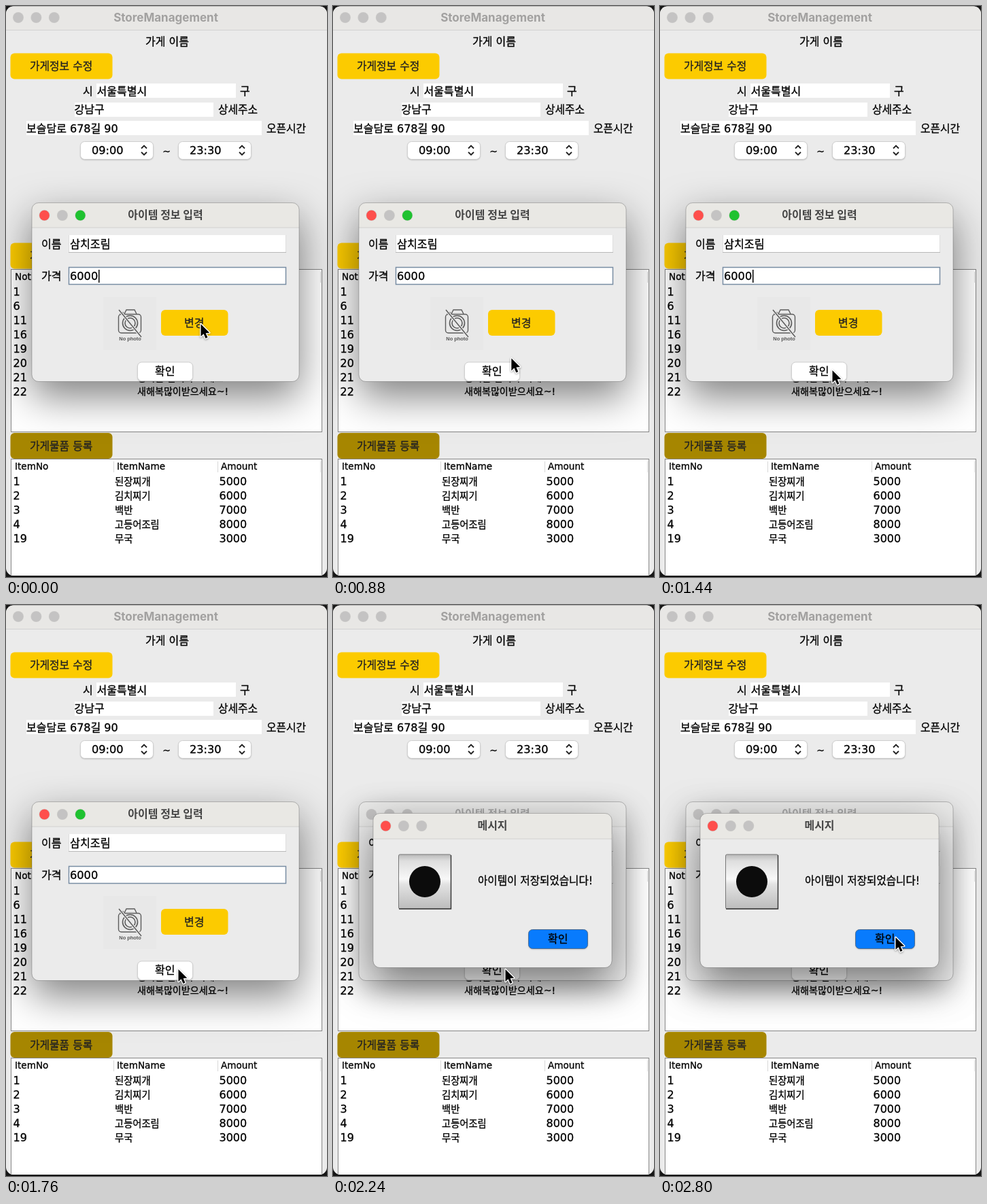
Animation of 472x840 px, one loop 2.88 s. Source, as an HTML page with a canvas:

```html
<!DOCTYPE html>
<html lang="ko">
<head>
<meta charset="utf-8">
<title>StoreManagement</title>
<style>
html, body { margin: 0; width: 100%; height: 100%; overflow: hidden; background: #161616; }
canvas { display: block; }
</style>
</head>
<body>
<canvas id="stage" width="472" height="840"></canvas>
<script>
const ctx = document.getElementById('stage').getContext('2d');
const LOOP = 2880, STEP = 80;
const UI = '"DejaVu Sans", "Noto Sans CJK KR", "Noto Sans CJK JP", sans-serif';
const TITLE = 'Inter, "Noto Sans CJK KR", "Noto Sans CJK JP", sans-serif';
const YELLOW = '#fccb00', PANEL = '#ebebeb', GREY = '#c4c3c3', FOCUS = '#788da3';

// Text is placed by its left edge (or centre) and its vertical middle.
function text(s, x, y, size = 16, color = '#000', align = 'left', weight = 500, family = UI) {
  ctx.font = `${weight} ${size}px ${family}`;
  ctx.fillStyle = color;
  ctx.textAlign = align;
  const base = y + size * 0.365;
  ctx.fillText(s, x, base);
  if (weight === 500) {
    ctx.strokeStyle = color;
    ctx.lineWidth = 0.3;
    ctx.strokeText(s, x, base);
  }
}

function rect(x, y, w, h, color) {
  ctx.fillStyle = color;
  ctx.fillRect(x, y, w, h);
}

function round(x, y, w, h, r, fill, stroke, line = 1) {
  ctx.beginPath();
  ctx.roundRect(x, y, w, h, r);
  if (fill) { ctx.fillStyle = fill; ctx.fill(); }
  if (stroke) { ctx.strokeStyle = stroke; ctx.lineWidth = line; ctx.stroke(); }
}

function disc(x, y, r, color) {
  ctx.beginPath();
  ctx.arc(x, y, r, 0, Math.PI * 2);
  ctx.fillStyle = color;
  ctx.fill();
}

function path(points, stroke, line) {
  ctx.beginPath();
  points.forEach(([x, y], i) => i ? ctx.lineTo(x, y) : ctx.moveTo(x, y));
  if (stroke) { ctx.strokeStyle = stroke; ctx.lineWidth = line; ctx.stroke(); }
}

function shadow(color, blur, dy) {
  ctx.shadowColor = color;
  ctx.shadowBlur = blur;
  ctx.shadowOffsetY = dy;
}

function raised(x, y, w, h, fill, border = '#cfcfcf') {
  ctx.save();
  shadow('rgba(0,0,0,.25)', 2, 1);
  round(x, y, w, h, 6, fill);
  ctx.restore();
  round(x, y, w, h, 6, null, border);
}

function lights(x, y, colors) {
  colors.forEach((c, i) => {
    disc(x + i * 26.4, y, 8, 'rgba(0,0,0,.12)');
    disc(x + i * 26.4, y, 7.4, c);
  });
}

function yellowButton(label, y, fill = YELLOW) {
  round(6.5, y, 150, 38, 6, fill);
  text(label, 35, y + 19, 15.8, '#222');
}

function spinner(x, value) {
  raised(x + 0.5, 199.5, 107, 26, '#fff');
  text(value, x + 17, 212.5, 16.2);
  const c = x + 94;
  path([[c - 4, 209.5], [c, 205.5], [c + 4, 209.5]], '#222', 1.8);
  path([[c - 4, 215], [c, 219], [c + 4, 215]], '#222', 1.8);
}

function table(y, h, heads) {
  rect(7, y, 458, h, '#fff');
  ctx.strokeStyle = '#868686';
  ctx.lineWidth = 1;
  ctx.strokeRect(7.5, y + 0.5, 457, h - 1);
  heads.forEach(([label, x]) => {
    text(label, x, y + 11.5, 13.6);
    if (x > 20) rect(x - 5, y + 4, 1, 16, '#d8d8d8');
  });
  rect(462, y + 4, 1, 16, '#d8d8d8');
}

function drawMain() {
  rect(0, 0, 472, 840, '#161616');
  ctx.save();
  ctx.beginPath();
  ctx.roundRect(0, 0.5, 472, 837.5, 11);
  ctx.clip();
  rect(0, 0, 472, 840, PANEL);
  rect(0, 0, 472, 35, '#e8e7e5');
  rect(0, 35, 472, 1, '#d2d2d2');
  lights(18, 17, [GREY, GREY, GREY]);
  text('StoreManagement', 235, 16.5, 17, '#a2a1a0', 'center', 700, TITLE);

  text('가게 이름', 205, 52.5, 16);
  yellowButton('가게정보 수정', 69.5);
  rect(133, 114, 205, 21, '#fff');
  rect(101, 142, 204, 21, '#fff');
  rect(30, 169, 346, 21, '#fff');
  text('시', 113, 125);
  text('서울특별시', 133.5, 125);
  text('구', 344, 125);
  text('강남구', 100.5, 152.5);
  text('상세주소', 312, 152.5, 15.8);
  text('보슬담로 678길 90', 30, 180);
  text('오픈시간', 383, 180, 15.8);
  spinner(109, '09:00');
  spinner(253, '23:30');
  text('~', 236, 214, 14, '#000', 'center');

  yellowButton('가게공지 등록', 348.5);
  table(387, 240, [['NoticeNo', 13]]);
  [1, 6, 11, 16, 19, 20, 21, 22].forEach((n, i) => text(n, 10.5, 420.5 + i * 21));
  text('정직한 관리자 되세요', 193, 546.5, 14.2);
  text('새해복많이받으세요~!', 193, 567, 14.1);

  yellowButton('가게물품 등록', 628, '#a68600');
  table(666, 180, [['ItemNo', 13], ['ItemName', 163], ['Amount', 316]]);
  const items = [[1, '된장찌개', 5000], [2, '김치찌기', 6000], [3, '백반', 7000],
    [4, '고등어조림', 8000], [19, '무국', 3000]];
  items.forEach(([no, name, price], i) => {
    const y = 699.5 + i * 21;
    text(no, 10.5, y);
    text(name, 160, y, 14.3);
    text(price, 313.5, y);
  });
  ctx.restore();
}

function dialog(x, y, w, h, bar, title, colors, active) {
  ctx.save();
  if (active) shadow('rgba(0,0,0,.5)', 58, 22);
  else shadow('rgba(0,0,0,.27)', 42, 14);
  round(x, y, w, h, 10, PANEL);
  ctx.restore();
  round(x, y, w, bar, [10, 10, 0, 0], active ? '#e9e8e4' : '#e8e8e7');
  rect(x, y + bar - 1, w, 1, '#d3d3d2');
  round(x, y, w, h, 10, null, 'rgba(0,0,0,.24)');
  lights(x + 18.5, y + 18.5, colors);
  text(title, x + w / 2, y + 18, 16, active ? '#454545' : '#a8a8a8', 'center', 700, TITLE);
}

function field(label, value, y, focused) {
  text(label, 52, y + 13.5);
  rect(92, y, 320, 26, '#fff');
  if (focused) {
    ctx.strokeStyle = FOCUS;
    ctx.lineWidth = 1.5;
    ctx.strokeRect(92.5, y + 0.5, 319, 25);
  } else {
    rect(92, y + 25, 320, 1, '#b9b9b9');
    rect(92, y, 1, 25, '#dedede');
    rect(411, y, 1, 25, '#dedede');
  }
  text(value, 94, y + 13.5, 16.2);
}

function drawPhoto() {
  const ink = '#5c5c5c', paper = '#e8e8e8';
  rect(143, 428, 78, 78, paper);
  round(165.5, 453.5, 33, 27.5, 4, null, ink, 1.4);
  path([[174, 453], [177, 447], [189, 447], [192, 453]], ink, 1.4);
  round(168, 450.5, 5, 3, 1, null, ink);
  for (const r of [11, 7.5]) {
    ctx.beginPath();
    ctx.arc(182.5, 466.5, r, 0, Math.PI * 2);
    ctx.lineWidth = 1.6;
    ctx.stroke();
  }
  path([[166, 447], [199, 487]], paper, 4);
  path([[166, 447], [199, 487]], ink, 1.5);
  text('No photo', 182.5, 489, 7.4, '#555', 'center', 700, '"Liberation Sans", sans-serif');
}

function drawItemDialog(active, pressed, caret) {
  dialog(38, 289.5, 393, 263, 37, '아이템 정보 입력',
    active ? ['#fe4f4c', GREY, '#1fc230'] : [GREY, GREY, GREY], active);
  field('이름', '삼치조림', 337, false);
  field('가격', '6000', 384, active && !pressed);
  if (caret) rect(136, 388, 1.5, 19, '#000');
  drawPhoto();
  round(228, 447, 98.5, 38, 6, YELLOW);
  text('변경', 262, 466, 16, '#222');
  raised(193.5, 524, 81, 27.5, pressed ? '#ededed' : '#fff');
  if (pressed) round(193.5, 524, 81, 27.5, 6, null, FOCUS, 2);
  text('확인', 219, 537);
}

function drawMessage() {
  dialog(59, 306.5, 351, 227, 38, '메시지', ['#fe4f4c', GREY, GREY], true);
  const g = ctx.createLinearGradient(0, 367, 0, 447);
  g.addColorStop(0, '#b9b9b9');
  g.addColorStop(0.12, '#dedede');
  g.addColorStop(0.45, '#f8f8f8');
  g.addColorStop(0.55, '#e2e2e2');
  g.addColorStop(1, '#bcbcbc');
  round(96.5, 367, 77, 80, 2, g, '#777');
  path([[97, 447], [173.5, 447], [173.5, 368]], '#3a3a3a', 1.5);
  disc(135, 407, 23, '#0c0c0c');
  text('아이템이 저장되었습니다!', 213, 405.5, 15.6);
  raised(287.5, 477.5, 87, 28, '#087bfd', '#4c6c92');
  text('확인', 316, 491);
}

function drawCursor(x, y) {
  ctx.save();
  ctx.translate(x, y);
  ctx.scale(1.06, 1.06);
  path([[0, 0], [0, 17], [3.9, 13.4], [6.6, 19.7], [9.4, 18.5], [6.7, 12.4], [12, 12]]);
  ctx.closePath();
  ctx.lineJoin = 'round';
  ctx.strokeStyle = '#fff';
  ctx.lineWidth = 2.6;
  shadow('rgba(0,0,0,.35)', 3, 1);
  ctx.stroke();
  ctx.shadowColor = 'transparent';
  ctx.fillStyle = '#000';
  ctx.fill();
  ctx.restore();
}

function ease(t, from, to) {
  const p = Math.min(1, Math.max(0, (t - from) / (to - from)));
  return p * p * (3 - 2 * p);
}

function cursorAt(t) {
  const nudge = ease(t, 0, 400), down = ease(t, 560, 1040), over = ease(t, 2320, 2720);
  return [286.5 + nudge - 34 * down + 93 * over, 468 + 68 * down - 47 * over];
}

function draw(t) {
  const pressed = t >= 2080, saved = t >= 2240;
  const caret = !pressed && (t < 560 || (t >= 1120 && t < 1600));
  drawMain();
  drawItemDialog(!saved, pressed && !saved, caret);
  if (saved) drawMessage();
  drawCursor(...cursorAt(t));
}

const start = performance.now();
let last = -1;
function tick() {
  const t = Math.floor((performance.now() - start) % LOOP / STEP) * STEP;
  if (t !== last) draw(last = t);
  requestAnimationFrame(tick);
}
tick();
</script>
</body>
</html>
```
